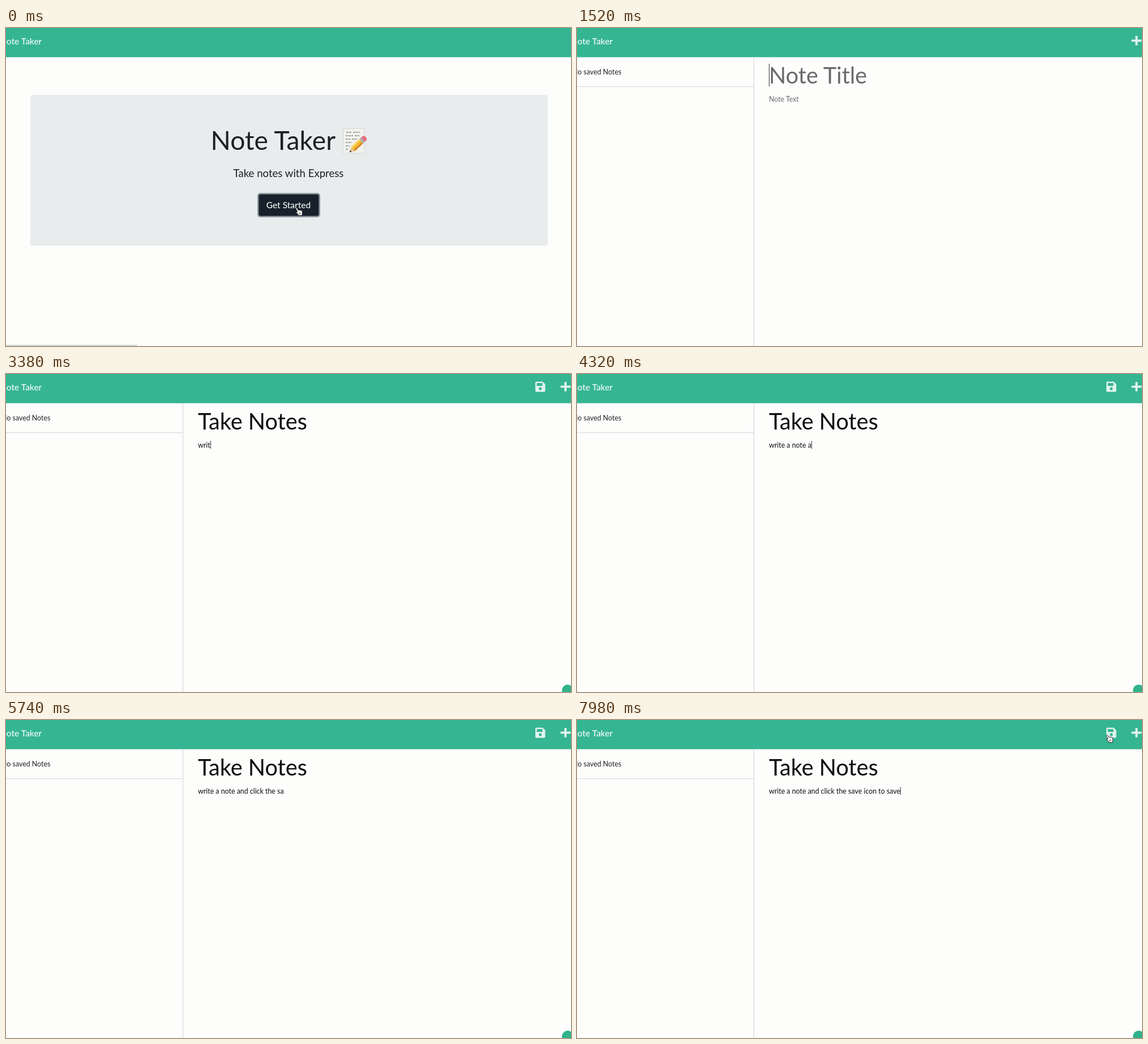
An HTML page that plays this animation: 998 by 561 pixels, repeating every 8 s.

```html
<!DOCTYPE html>
<html lang="en">
<head>
<meta charset="utf-8">
<title>Note Taker</title>
<style>
  html, body { margin: 0; width: 100%; height: 100%; overflow: hidden; background: #fdfdfc; }
  svg { display: block; width: 100vw; height: 100vh; }
  text { font-family: Lato, "Open Sans", sans-serif; font-size: 12.4px; fill: #1c2024; white-space: pre; }
  .brand { font-size: 15.5px; font-weight: 500; fill: #f4fbf8; }
  .hero { font-size: 46.3px; }
  .lead { font-size: 18.6px; }
  .title { font-size: 39.7px; }
  .typed { fill: #0c0c0d; }
  .hint { fill: #6a6a6e; }
  .rule { stroke: #d4d4de; fill: none; }
  .icon { fill: #e2f3ee; }
  .pointer { stroke: #222; stroke-width: 1; stroke-linejoin: round; fill: #fff; }
</style>
</head>
<body>
<svg viewBox="0 0 998 561" preserveAspectRatio="none">
  <rect width="998" height="561" fill="#fdfdfc"/>
  <rect width="998" height="51.5" fill="#35b592"/>
  <text class="brand" x="63.3" y="28.5" text-anchor="end">Note Taker</text>

  <g id="home">
    <rect x="43" y="118" width="914" height="266" rx="4" fill="#e8eced"/>
    <text class="hero" x="582" y="215" text-anchor="end">Note Taker</text>
    <g id="memo">
      <path d="M596 178L633 177L634 221L595 221Z" fill="#f1f1ee" stroke="#d5d6d4"/>
      <path d="M601 184h9m3 0h12M600 190h13m3 0h8M600 196h8m3 0h9M600 202h11M600 208h7M600 214h5"
            stroke="#858789" stroke-width="1.3" stroke-dasharray="4 1" fill="none"/>
      <g transform="translate(607 219) rotate(-43)">
        <path d="M0 0L8-5V5Z" fill="#e7c595"/>
        <path d="M0 0L3-2V2Z" fill="#333"/>
        <path d="M8-5H28V5H8Z" fill="#f2b632"/>
        <path d="M8-5H28V-2H8Z" fill="#ffd45a"/>
        <path d="M8 2H28V5H8Z" fill="#d58a25"/>
        <path d="M28-5h4V5h-4Z" fill="#a9b0b4"/>
        <path d="M32-5h3q4 0 4 5t-4 5h-3Z" fill="#e5707d"/>
      </g>
    </g>
    <text class="lead" x="499" y="263" text-anchor="middle">Take notes with Express</text>
    <rect x="444" y="291" width="111" height="43" rx="5" fill="#8e999f"/>
    <rect x="446.5" y="293.5" width="106" height="38" rx="3" fill="#17202b"/>
    <text class="brand" x="499" y="318.3" text-anchor="middle">Get Started</text>
  </g>

  <g id="notes">
    <path class="rule" d="M312.5 52V561M0 103.5H312"/>
    <text x="78.3" y="82" text-anchor="end">No saved Notes</text>
    <path class="icon" d="M986.3 14h3.9v6.4h7v3.8h-7v6.4h-3.9v-6.4h-6.8v-3.8h6.8Z"/>
    <path id="save" class="icon" fill-rule="evenodd"
          d="M937 13.5H948L952.5 18V29.5Q952.5 31.5 950.5 31.5H937Q935 31.5 935 29.5V15.5Q935 13.5 937 13.5Z
             M937.5 16V21H947.5V16ZM943.7 23.3a2.6 2.6 0 1 0 .1 0Z"/>
    <text id="title" class="title" x="339" y="98"></text>
    <text id="body" x="339" y="130"></text>
    <rect id="caret" width="1" fill="#333"/>
    <circle id="badge" cx="992" cy="558" r="10" fill="#30b28b"/>
  </g>

  <rect id="status" y="559" width="232" height="2" fill="#c8d9d4"/>

  <g id="mouse" class="pointer">
    <path id="hand" d="M-4.5-6.3q1.4-1 2.4.8l1.3 3 1.5-.5 1.3.5 1.6-.3 1 .9 1.3.1q1.2 4 .1 7v1.5h-6.5l-1.2-2.5-3-3.2q-.3-1.6 1.8-.8l.9.5-2.7-5.5q-.4-1 .2-1.5Z
                       M.8 2v2.5M2.8 1.8v2.5"/>
    <path id="beam" d="M-2.5-7Q0-7 0-5V5Q0 7-2.5 7M2.5-7Q0-7 0-5M0 5Q0 7 2.5 7" fill="none"/>
    <path id="arrow" d="M-4-7V5L-1 2.3 1 7 3 6 1 1.7H5Z" fill="#111" stroke="#fff"/>
  </g>
</svg>
<script>
  const LOOP = 8000, PAGE_LOADED = 160, TITLE_FOCUS = 1340, BODY_FOCUS = 2640;
  const TITLE = "Take Notes", BODY = "write a note and click the save icon to save";

  // [time, characters typed]
  const titleKeys = [[1480, 0], [2340, 10]];
  const bodyKeys = [[2950, 0], [4320, 14], [5700, 29], [6680, 37], [7500, 44]];
  // [time, position]
  const mouseX = [[640, 517], [1300, 430], [7540, 430], [7920, 940]];
  const mouseY = [[640, 324], [1300, 88], [7540, 88], [7920, 33]];

  const el = id => document.getElementById(id);
  const show = (id, on) => el(id).style.display = on ? "" : "none";
  const smooth = p => p * p * (3 - 2 * p);

  function track(keys, t, ease = p => p) {
    if (t <= keys[0][0]) return keys[0][1];
    for (let i = 1; i < keys.length; i++) {
      const [t0, a] = keys[i - 1], [t1, b] = keys[i];
      if (t < t1) return a + (b - a) * ease((t - t0) / (t1 - t0));
    }
    return keys[keys.length - 1][1];
  }

  function fill(id, value, hint, t, keys) {
    const typed = value.slice(0, Math.floor(track(keys, t) + 1e-6));
    const node = el(id);
    node.textContent = typed || hint;
    node.classList.toggle("hint", !typed);
    node.classList.toggle("typed", !!typed);
    return typed;
  }

  function placeCaret(id, typed, y, height) {
    const width = typed ? el(id).getComputedTextLength() : 0;
    const caret = el("caret");
    caret.setAttribute("x", Math.round(339 + width));
    caret.setAttribute("y", y);
    caret.setAttribute("height", height);
  }

  function drawMouse(t) {
    const x = track(mouseX, t, smooth), y = track(mouseY, t, smooth);
    const hand = t < 680 || (x > 928 && y < 45);
    const beam = !hand && y > 52;
    show("mouse", t < 1480 || t > 7540);
    show("hand", hand);
    show("beam", beam);
    show("arrow", !hand && !beam);
    el("mouse").setAttribute("transform", `translate(${x} ${y})`);
  }

  function draw(t) {
    const loaded = t >= PAGE_LOADED;
    show("home", !loaded);
    show("notes", loaded);
    show("status", t < 680);

    const title = fill("title", TITLE, "Note Title", t, titleKeys);
    const body = fill("body", BODY, "Note Text", t, bodyKeys);
    show("save", title && body);
    show("badge", t >= BODY_FOCUS);
    show("caret", t >= TITLE_FOCUS && !(t > 5710 && t < 5810));
    if (loaded) {
      if (t < BODY_FOCUS) placeCaret("title", title, 63, 40);
      else placeCaret("body", body, 118, 14);
    }
    drawMouse(t);
  }

  const start = performance.now();
  function tick() {
    draw((performance.now() - start) % LOOP);
    requestAnimationFrame(tick);
  }
  tick();
</script>
</body>
</html>
```
